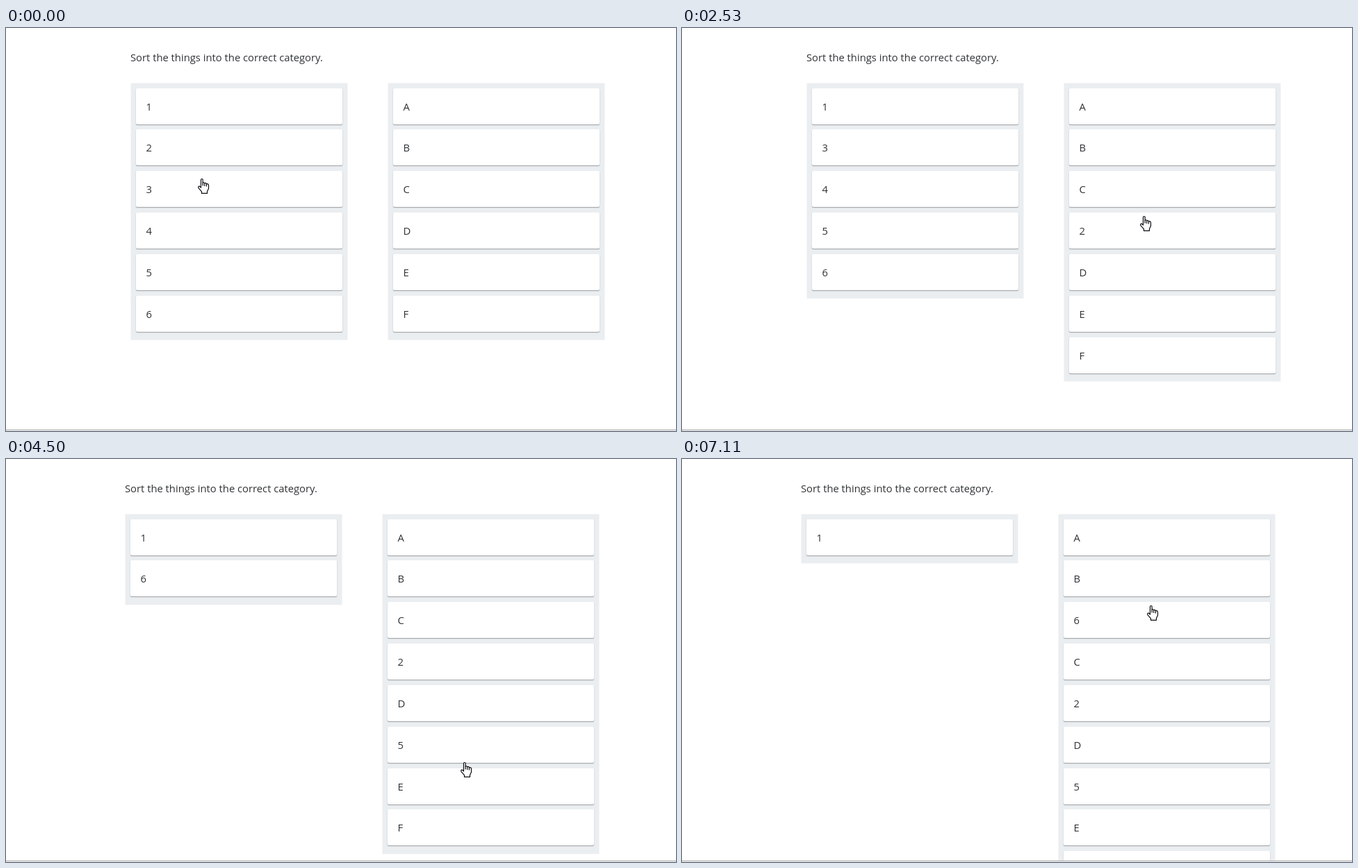
Recreate the animation shown at these times as an HTML page with a canvas. Size 964 px wide and 581 px high, loop 8580 ms.

```html
<!DOCTYPE html>
<html lang="en">
<head>
<meta charset="utf-8">
<title>Sorting lists</title>
<style>
  html, body { margin: 0; width: 100%; height: 100%; overflow: hidden; background: #fff; }
  canvas { display: block; }
</style>
</head>
<body>
<canvas id="stage" width="964" height="581"></canvas>
<script>
const W = 964, H = 581, LOOP = 8580, STEP = 79;
const stage = document.getElementById('stage').getContext('2d');
const layerCanvas = Object.assign(document.createElement('canvas'), { width: W, height: H });
const layer = layerCanvas.getContext('2d');

const FONT = '14.8px "Open Sans", "Noto Sans", sans-serif';
const INK = '#303436';
const CARD = { w: 297, h: 52, pitch: 59.85, top: 86.5, inset: 7.5 };
const COLUMN = { w: 312, top: 79.5, gap: 370 };
const GHOST_RADIUS = 220;

// Each stage lists both columns, the left page edge and the card dragged next.
const STAGES = [
  { at: 0, left: '123456', right: 'ABCDEF', x: 179.5, drag: '2', press: 1250, lift: 1490 },
  { at: 2450, left: '13456', right: 'ABC2DEF', x: 179.5, drag: '5', press: 3480, lift: 3560 },
  { at: 4500, left: '16', right: 'ABC2D5EF', x: 171.5, drag: '6', press: 5920, lift: 6000 },
  { at: 7110, left: '1', right: 'AB6C2D5EF', x: 171.5 }
];

// Pointer arcs; each one begins where the previous one ended.
const START = [280.5, 218];
const ARCS = [
  { from: 380, to: 1090, via: [318, 198], end: [268, 180] },
  { from: 1410, to: 2290, via: [368, 260], end: [664, 272] },
  { from: 2760, to: 3320, via: [490, 192], end: [321.5, 277] },
  { from: 3560, to: 4110, via: [480, 342], end: [658.5, 438] },
  { from: 4730, to: 5450, via: [500, 260], end: [382, 168.5] },
  { from: 6000, to: 6870, via: [620, 290], end: [673.5, 212] }
];

const smooth = u => u * u * (3 - 2 * u);
const cardTop = row => Math.round(CARD.top + row * CARD.pitch);

function pointerAt(t) {
  const i = ARCS.findLastIndex(arc => arc.from <= t);
  if (i < 0) return START;
  const { from, to, via, end } = ARCS[i];
  const begin = i ? ARCS[i - 1].end : START;
  const steps = Math.round((to - from) / STEP) + 1;
  const step = Math.floor((t - from) / (to - from) * (steps - 1) + 0.001) + 1;
  const u = smooth(Math.min(1, step / steps)), v = 1 - u;
  return [0, 1].map(n => v * v * begin[n] + 2 * u * v * via[n] + u * u * end[n]);
}

function roundRect(ctx, x, y, w, h, r) {
  ctx.beginPath();
  ctx.roundRect(x, y, w, h, r);
  ctx.fill();
}

function write(ctx, text, x, y) {
  ctx.font = FONT;
  ctx.fillStyle = INK;
  ctx.fillText(text, x, y);
}

function drawCard(ctx, label, x, y) {
  ctx.fillStyle = '#fff';
  roundRect(ctx, x, y, CARD.w, CARD.h, 2);
  write(ctx, label, x + 14.4, y + 32);
}

function drawShadow(x, y) {
  stage.save();
  stage.shadowColor = 'rgba(0,0,0,.2)';
  stage.shadowBlur = 2;
  stage.fillStyle = '#a6aaac';
  roundRect(stage, x, y + 1, CARD.w, CARD.h, 2);
  stage.restore();
}

function drawList(labels, x) {
  stage.fillStyle = '#ebeef1';
  stage.fillRect(x, COLUMN.top, COLUMN.w, 71 + (labels.length - 1) * CARD.pitch);
  [...labels].forEach((label, row) => {
    drawShadow(x + CARD.inset, cardTop(row));
    drawCard(stage, label, x + CARD.inset, cardTop(row));
  });
}

// Translucent copy of the dragged card that fades out away from the pointer.
function drawGhost(scene, [x, y]) {
  const grab = pointerAt(scene.press);
  const row = scene.left.indexOf(scene.drag);
  layer.clearRect(0, 0, W, H);
  drawCard(layer, scene.drag, scene.x + CARD.inset + x - grab[0], cardTop(row) + y - grab[1]);
  const fade = layer.createRadialGradient(x, y, 0, x, y, GHOST_RADIUS);
  fade.addColorStop(0, 'rgba(0,0,0,.78)');
  fade.addColorStop(1, 'rgba(0,0,0,0)');
  layer.globalCompositeOperation = 'destination-in';
  layer.fillStyle = fade;
  layer.fillRect(0, 0, W, H);
  layer.globalCompositeOperation = 'source-over';
  stage.drawImage(layerCanvas, 0, 0);
}

const HAND = new Path2D('M4.5 13V2Q4.5 .5 5.8 .5Q7.2 .5 7.2 2V6.2Q8.4 5 9.8 6.7'
  + 'Q11.4 5.8 12.5 7.6Q15.5 7.2 15.5 10V14.5L13.5 18.5V21.3H5.5V18.8L.9 13.6Q.2 11.2 2.2 11Z');
const FINGERS = new Path2D('M7.2 6V10.5M9.8 6.7V11M12.5 7.6V11.5');

function drawHand([x, y]) {
  stage.save();
  stage.translate(Math.round(x - 5), Math.round(y - 1));
  stage.lineWidth = 1.2;
  stage.lineJoin = 'round';
  stage.strokeStyle = '#0c0c12';
  stage.fillStyle = '#fff';
  stage.fill(HAND);
  stage.stroke(HAND);
  stage.stroke(FINGERS);
  stage.restore();
}

function drawNoDrop([x, y]) {
  const r = 8, d = r * Math.SQRT1_2;
  stage.strokeStyle = '#2b2b24';
  stage.lineWidth = 2;
  stage.beginPath();
  stage.arc(x, y, r, 0, 2 * Math.PI);
  stage.moveTo(x - d, y - d);
  stage.lineTo(x + d, y + d);
  stage.stroke();
}

function drawHighlight([x, y]) {
  stage.save();
  stage.globalCompositeOperation = 'multiply';
  stage.fillStyle = '#fffb66';
  stage.beginPath();
  stage.arc(x, y, 11.7, 0, 2 * Math.PI);
  stage.fill();
  stage.restore();
}

function draw(t) {
  const scene = STAGES.findLast(s => s.at <= t);
  const pointer = pointerAt(t);

  stage.fillStyle = '#fff';
  stage.fillRect(0, 0, W, H);
  write(stage, 'Sort the things into the correct category.', scene.x - 0.5, 48);
  drawList(scene.left, scene.x);
  drawList(scene.right, scene.x + COLUMN.gap);

  if (t >= scene.lift) {
    drawGhost(scene, pointer);
    drawNoDrop(pointer);
  } else {
    drawHand(pointer);
  }
  if (t >= scene.press) drawHighlight(pointer);

  stage.fillStyle = '#fff';
  stage.fillRect(0, 579, W, 2);
  stage.fillStyle = '#a0a0a0';
  stage.fillRect(0, 579, W, 1);
}

const start = performance.now();
function tick() {
  draw((performance.now() - start) % LOOP);
  requestAnimationFrame(tick);
}
tick();
</script>
</body>
</html>
```
